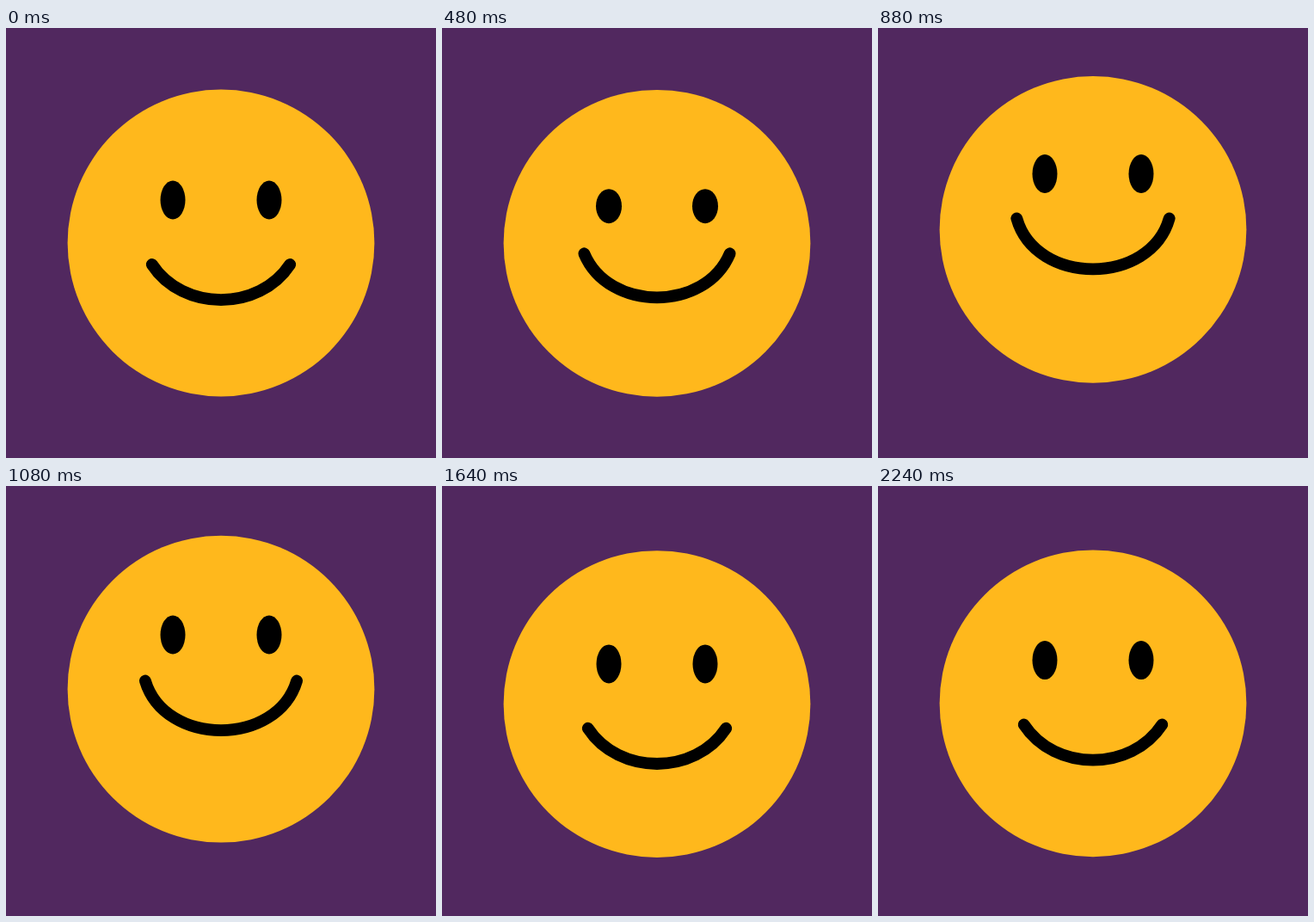
Recreate the animation shown at these times as an HTML page. Size 500 by 500 pixels, loop 2.58 s.

```html
<!DOCTYPE html>
<html lang="en">
<head>
<meta charset="utf-8">
<title>Nodding smiley</title>
<style>
  html, body { margin: 0; width: 100%; height: 100%; overflow: hidden; background: #51285f; }
  svg { display: block; width: 100vw; height: 100vh; }
</style>
</head>
<body>
<svg viewBox="0 0 500 500">
  <circle id="head" cx="250" r="178.4" fill="#ffb81c"/>
  <ellipse class="eye" cx="194"/>
  <ellipse class="eye" cx="306"/>
  <path id="mouth" fill="none" stroke="#000" stroke-width="13.8" stroke-linecap="round"/>
</svg>
<script>
const LOOP = 2580, STEP = 20;
const FOLLOW = 1.95; // the features travel further than the head

// Turning points of the nod; soft is the length of the easing handles.
const NOD = [
  { at: 40,   y: 0 },
  { at: 300,  y: 29.2, squint: 1 },
  { at: 880,  y: -15.6, grin: 1, soft: 1 },
  { at: 1400, y: 10.4 },
  { at: 1800, y: -.2 }
];
const SETTLE = { from: 1840, to: 2240, y: 3 };

const head = document.getElementById('head');
const mouth = document.getElementById('mouth');
const eyes = document.querySelectorAll('.eye');

const clamp = u => Math.min(1, Math.max(0, u));
const mix = (a, b, k) => a + (b - a) * k;
const smooth = s => s * s * (3 - 2 * s);

function set(el, attrs) {
  for (const name in attrs) el.setAttribute(name, attrs[name]);
}

// cubic-bezier(out, 0, 1 - into, 1), solved by bisection
function ease(u, out, into) {
  let lo = 0, hi = 1;
  for (let i = 0; i < 24; i++) {
    const s = (lo + hi) / 2, r = 1 - s;
    const x = 3 * r * r * s * out + 3 * r * s * s * (1 - into) + s ** 3;
    if (x < u) lo = s;
    else hi = s;
  }
  return smooth(lo);
}

function pose(t) {
  const next = NOD.findIndex(key => key.at > t);
  const i = next < 0 ? NOD.length - 1 : Math.max(1, next);
  const a = NOD[i - 1], b = NOD[i];
  const k = ease(clamp((t - a.at) / (b.at - a.at)), a.soft || 1 / 3, b.soft || 1 / 3);
  const value = name => mix(a[name] || 0, b[name] || 0, k);
  return { nod: value('y'), squint: value('squint'), grin: value('grin') };
}

function draw(t) {
  const { nod, squint, grin } = pose(t);
  const settle = SETTLE.y * smooth(clamp((t - SETTLE.from) / (SETTLE.to - SETTLE.from)));
  const face = nod * FOLLOW + settle;
  const shut = squint * squint;

  set(head, { cy: 250 + nod + settle });
  for (const eye of eyes) {
    set(eye, {
      cy: 200 + face + 18.5 * squint,
      rx: mix(14.5, 18.6, shut),
      ry: mix(22.5, 2.3, shut)
    });
  }

  const half = 80.3 - 2.8 * squint + 8.4 * grin;
  const inset = 36 + 4 * squint - 14 * grin;
  const depth = 41.2 - 4.2 * squint + 17.6 * grin;
  const top = 274.9 + face + 4.5 * squint - 23 * grin;
  const low = top + depth / .75;
  const l = 250 - half, r = 250 + half;
  set(mouth, { d: `M${l} ${top}C${l + inset} ${low} ${r - inset} ${low} ${r} ${top}` });
}

const start = performance.now();
function tick() {
  const t = (performance.now() - start) % LOOP;
  draw(Math.floor(t / STEP) * STEP);
  requestAnimationFrame(tick);
}
tick();
</script>
</body>
</html>
```
